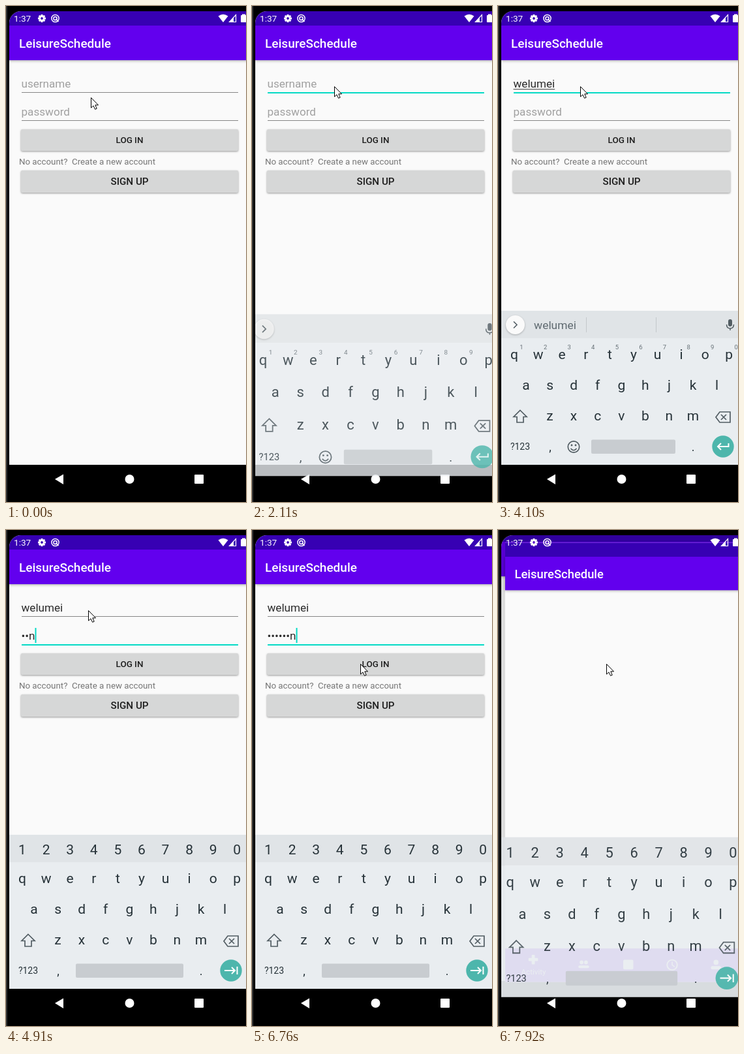
An HTML page with a canvas for the animation above (8000 ms loop, 368 px wide and 760 px high).

```html
<!DOCTYPE html>
<html lang="en">
<head>
<meta charset="utf-8">
<title>Login screen</title>
<style>
html, body { margin: 0; width: 100%; height: 100%; overflow: hidden; background: #000; }
canvas { display: block; }
</style>
</head>
<body>
<canvas id="stage" width="368" height="760"></canvas>
<script>
const c = document.getElementById('stage').getContext('2d');
const LOOP = 8000, TEAL = '#03dac5', PAPER = '#fafafa', INK = '#263238', ICON = '#525d63';
const TITLE = 'LeisureSchedule', USER = 'welumei', SECRET = 'sunloon';

// Each track is a list of [start, value]; a value holds until the next start.
const POINTER = [[0, [130, 140]], [150, [127, 131]], [290, [127, 124]], [540, [126, 123]],
  [6480, [151, 210]], [6630, [161, 223]], [6760, [166, 205]]];
const FOCUS = [[0, ''], [1530, 'user'], [4400, 'pass']];
const CARET = [[0, 0], [1530, 1], [2110, 0], [2660, 1], [4100, 0], [4400, 1],
  [6200, 0], [6630, 1], [7190, 0]];
const USER_LEN = [[0, 0], [2940, 2], [3090, 3], [3240, 4], [3360, 5], [3660, 7]];
const PASS_LEN = [[0, 0], [4670, 1], [4790, 2], [4910, 3], [5190, 4], [5340, 5], [5470, 6], [5620, 7]];
const HINTS = [[0, []], [2940, ['we', 'well', "we're"]], [3090, ['wel', 'well', 'welcome']],
  [3240, ['welu', 'well', 'welcome']], [3360, ['welu', 'welcome']],
  [3510, ['welum', 'welcome']], [3660, [USER]]];
const PRESS = [[0, 0], [7070, 0.05], [7190, 0.08], [7340, 0]];

function at(track, t) {
  let value = track[0][1];
  for (const [start, v] of track) if (t >= start) value = v;
  return value;
}

function rect(x, y, w, h, fill, r = 0) {
  c.fillStyle = fill;
  c.beginPath();
  c.roundRect(x, y, w, h, r);
  c.fill();
}

function disc(x, y, r, fill) {
  c.fillStyle = fill;
  c.beginPath();
  c.arc(x, y, r, 0, 7);
  c.fill();
}

function ring(x, y, r, color, width) {
  c.strokeStyle = color;
  c.lineWidth = width;
  c.beginPath();
  c.arc(x, y, r, 0, 7);
  c.stroke();
}

function path(d, x, y, fill, stroke, width = 1.6) {
  const p = new Path2D(d);
  c.save();
  c.translate(x, y);
  if (fill) { c.fillStyle = fill; c.fill(p); }
  if (stroke) { c.strokeStyle = stroke; c.lineWidth = width; c.stroke(p); }
  c.restore();
}

function text(s, x, y, size, color, align = 'left', weight = 400) {
  c.font = `${weight} ${size}px Roboto, sans-serif`;
  c.textAlign = align;
  c.fillStyle = color;
  c.fillText(s, x, y);
  return c.measureText(s).width;
}

function shadow(blur, dy, alpha) {
  c.shadowColor = `rgba(0,0,0,${alpha})`;
  c.shadowBlur = blur;
  c.shadowOffsetY = dy;
}

function bars() {
  rect(5, 8, 390, 695, PAPER);
  c.save();
  shadow(4, 1, 0.35);
  rect(5, 30, 390, 53, '#6200ee');
  c.restore();
  rect(5, 8, 390, 22, '#3700b3');
  text(TITLE, 20, 64, 19, '#fff', 'left', 500);
}

function field(y, hint, value, focused, caret, composing) {
  const w = value ? text(value, 23.5, y, 17.1, '#2a2a2a') : 0;
  if (!value) text(hint, 23.5, y, 17.1, '#a0a0a0');
  if (composing && value) rect(23.5, y + 2, w, 1, '#444');
  if (focused) rect(24, y + 7, 332, 2, TEAL);
  else rect(24, y + 7, 332, 1, '#858585');
  if (focused && caret) rect(23.5 + w, y - 18, 2, 23, TEAL);
}

function button(label, y, h, size, press) {
  c.save();
  shadow(press ? 5 : 3, 1, 0.4);
  rect(23, y, 333, h, '#d6d7d7', 2);
  c.restore();
  if (press) rect(23, y, 333, h, `rgba(0,0,0,${press})`, 2);
  text(label, 189.5, y + h / 2 + size * 0.36, size, '#1e1e1e', 'center', 500);
}

function form(t) {
  const focus = at(FOCUS, t), caret = at(CARET, t), n = at(PASS_LEN, t);
  const masked = t >= 7190 ? '•'.repeat(n) : n ? '•'.repeat(n - 1) + SECRET[n - 1] : '';
  bars();
  field(125, 'username', USER.slice(0, at(USER_LEN, t)), focus === 'user', caret, focus === 'user');
  field(168, 'password', masked, focus === 'pass', caret, false);
  button('LOG IN', 189, 33, 13.4, at(PRESS, t));
  text('No account?  Create a new account', 20, 242.5, 13.3, '#757575');
  button('SIGN UP', 252, 34, 15.2, 0);
}

function statusIcons() {
  const white = '#fff';
  text('1:37', 12, 24, 13.6, white);
  for (let i = 0; i < 8; i++) {
    c.save();
    c.translate(55, 19);
    c.rotate(i * Math.PI / 4);
    rect(-1.5, -6, 3, 4, white);
    c.restore();
  }
  ring(55, 19, 3.2, white, 2.6);
  ring(75.5, 19, 5.6, white, 1.5);
  ring(75.5, 19, 2.6, white, 1.5);
  path('M1 1L5 5', 75.5, 19, null, white);
  path('M0 6L-7.5 -3.5Q0 -9 7.5 -3.5Z', 333, 19, white);
  path('M-5 5.5H5V-5.5Z', 347.5, 19, null, white, 1.2);
  path('M-5 5.5H1.5V-1.5Z', 347.5, 19, white);
  rect(360, 14, 9, 11, white, 1);
  rect(362, 12.5, 5, 2, white);
}

function navigation() {
  rect(0, 703, 368, 57, '#000');
  path('M-7 0L6 -7.5V8Z', 82, 725, '#fff');
  disc(189.5, 725, 7, '#fff');
  rect(289, 718, 14, 14, '#fff', 1);
}

function keyRow(keys, x, y) {
  [...keys].forEach((k, i) => text(k, x + i * 36.58, y, 21, INK, 'center'));
}

function suggestions(words) {
  c.save();
  shadow(3, 1, 0.25);
  disc(26.5, 488.5, 14.5, PAPER);
  c.restore();
  path('M-2.5 -5L2.5 0L-2.5 5', 26.5, 488.5, null, ICON);
  words.forEach((w, i) => text(w, [87.5, 188, 289.5][i], 495, 17.4, '#5f6a70', 'center'));
  if (words.length) [135, 242].forEach(x => rect(x, 477, 1, 23, '#c3c8cb'));
  rect(353, 480, 6, 11, ICON, 3);
  path('M-5.5 0Q-5.5 6 0 6Q5.5 6 5.5 0M0 6V9', 356, 488, null, ICON, 1.5);
}

function keyboard(secret, words) {
  rect(0, 467, 380, 42, '#e0e4e7');
  rect(0, 509, 380, 194, '#e9edf0');
  if (secret) keyRow('1234567890', 25, 497);
  else {
    suggestions(words);
    [...'1234567890'].forEach((d, i) => text(d, 36 + i * 36.58, 525.5, 9.5, '#687278', 'center'));
  }
  keyRow('qwertyuiop', 25, 540.5);
  keyRow('asdfghjkl', 43, 587.5);
  keyRow('zxcvbnm', 79.5, 635);
  path('M0 -9.5L10 0.5H5V9H-5V0.5H-10Z', 34, 629, null, ICON, 1.7);
  path('M-11 0L-5 -8H11V8H-5ZM-3 -4L5 4M5 -4L-3 4', 345, 630, null, ICON, 1.7);
  text('?123', 34, 680, 14, INK, 'center');
  text(',', 80, 682, 18, INK, 'center');
  text('.', 299, 682, 18, INK, 'center');
  const left = secret ? 107 : 143;
  rect(left, 664.5, 272 - left, 21.5, '#c8ccd0', 2);
  if (!secret) {
    ring(116, 675.5, 8.7, ICON, 1.7);
    disc(113, 673, 1.4, ICON);
    disc(119, 673, 1.4, ICON);
    path('M-4.5 2.5Q0 8 4.5 2.5', 116, 675.5, null, ICON);
  }
  disc(345, 675, 16.7, '#4db6ac');
  path(secret ? 'M-10 0H6M1 -5L6 0L1 5M9.5 -6V6' : 'M8.5 -5V0H-8M-3 -5L-8 0L-3 5',
    345, 675, null, '#fff', 2);
}

function bottomMenu() {
  const white = '#fff';
  rect(5, 650, 390, 53, '#6200ee');
  rect(42, 665, 15, 5, white, 1);
  rect(47, 660, 5, 15, white, 1);
  text('Activity', 50, 691, 12, white, 'center');
  for (const x of [126, 133]) {
    disc(x, 672, 3, white);
    rect(x - 5, 677, 10, 4, white, 2);
  }
  rect(192, 668, 16, 15, white, 2);
  ring(269.5, 676, 8, white, 2);
  path('M0 -5V0L4 3', 269.5, 676, null, white);
  disc(339, 672, 4, white);
  rect(331, 678, 16, 5, white, 2);
}

function scaled(k, dx, dy, draw, alpha = 1) {
  c.save();
  c.globalAlpha = alpha;
  c.transform(k, 0, 0, k, dx, dy);
  draw();
  c.restore();
}

function pointer([x, y]) {
  path('M0.5 0.5V16L4 12.8L6.6 18.3L9.2 17.2L6.8 11.8H11.5Z', x, y, '#fff', '#000', 1);
}

function render(t) {
  const opening = t >= 7920;
  rect(0, 0, 368, 760, '#000');
  rect(0, 0, 2, 760, '#303030');

  c.save();
  c.beginPath();
  c.roundRect(5, 8, 400, 752, [18, 0, 0, 0]);
  c.clip();
  if (opening) {
    scaled(1, 0, -12, bars);
    rect(5, 8, 363, 695, 'rgba(0,0,0,0.12)');
    scaled(0.968, 6.15, 12, () => { bars(); bottomMenu(); });
  } else form(t);
  statusIcons();
  navigation();
  const keys = () => keyboard(t >= 4400, at(HINTS, t));
  if (opening) scaled(1.038, -7.2, -14, keys, 0.93);
  else if (t >= 2230) keys();
  else if (t >= 2110) scaled(1.05, -9.3, -18, keys, 0.8);
  c.restore();

  pointer(at(POINTER, t));
}

const begin = performance.now();
function tick() {
  render((performance.now() - begin) % LOOP);
  requestAnimationFrame(tick);
}
tick();
</script>
</body>
</html>
```
